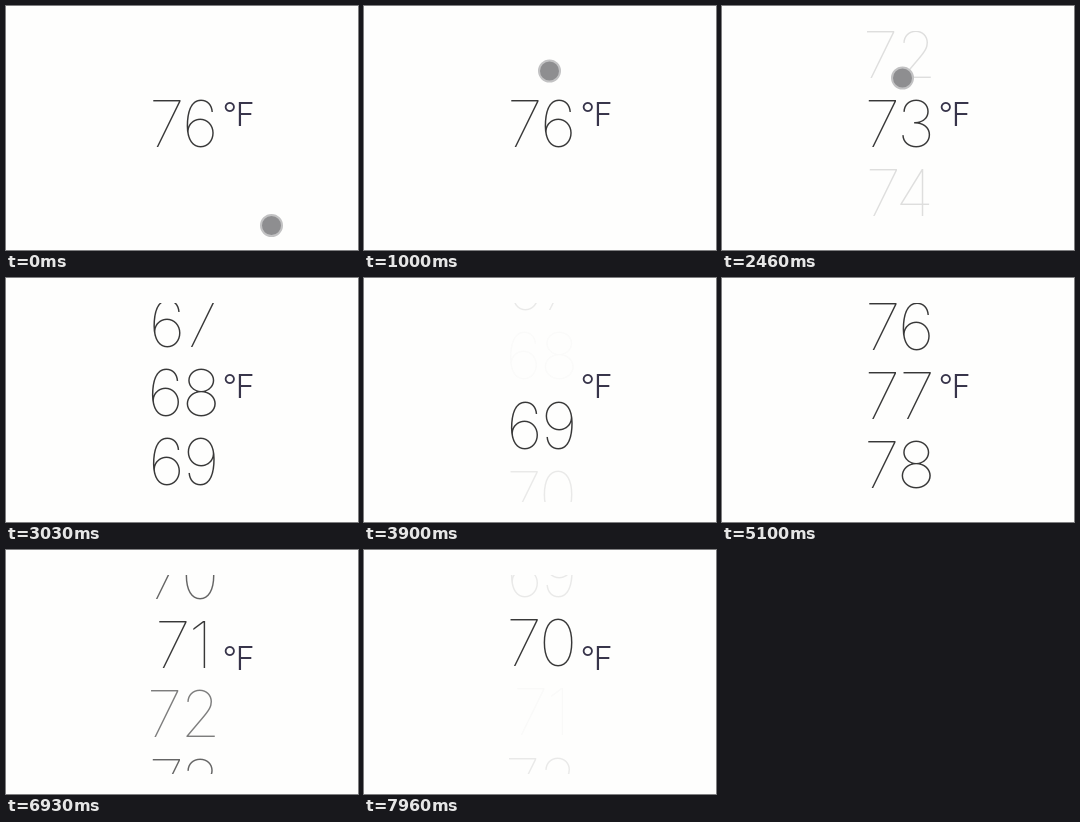
These frames come from a looping animation (352 px wide and 244 px high, 8 s). An HTML page:

```html
<!DOCTYPE html>
<html lang="en">
<head>
<meta charset="utf-8">
<title>Temperature picker</title>
<style>
html, body { margin: 0; width: 100%; height: 100%; overflow: hidden; background: #fefefd; }
svg { display: block; width: 100%; height: 100%; }
text { font-family: Inter, sans-serif; }
#wheel text { font-size: 64.5px; font-weight: 140; font-optical-sizing: none; letter-spacing: -.025em; text-anchor: middle; fill: #383838; }
#unit { font-size: 32px; font-weight: 300; letter-spacing: -.04em; fill: #37344a; }
#dot { fill: #8e8e90; stroke: #c2c2c3; stroke-width: 2; }
</style>
</head>
<body>
<svg viewBox="0 0 352 244">
  <clipPath id="window"><rect y="25" width="352" height="199"/></clipPath>
  <g id="wheel" clip-path="url(#window)"></g>
  <text id="unit" x="216.5" y="120">°F</text>
  <circle id="dot" r="10.5"/>
</svg>
<script>
const LOOP = 8000, PITCH = 69.2, BASELINE = 141.2, START = 76;

// Each swipe moves the dot from (x1, y1) to (x2, y2); the wheel glides to rest, then snaps.
const flicks = [
  { at: 1330, rest: 72.6, x1: 185.5, y1: 65, x2: 208, y2: 250 },
  { at: 2530, rest: 68, x1: 180.5, y1: 72, x2: 201, y2: 205 },
  { at: 3870, rest: 76.94, x1: 190, y1: 227, x2: 198, y2: 40 },
  { at: 5540, rest: 73.56, x1: 209, y1: 14.5, x2: 207, y2: 250 },
  { at: 6700, rest: 70, x1: 206, y1: 60, x2: 196, y2: 205 },
  { at: 7930, rest: 73.5, x1: 196, y1: 221, x2: 202, y2: 15 }
];

let value = START;
for (const f of flicks) {
  f.from = value;
  f.glide = f.at + 290 + 52 * Math.abs(f.rest - value);
  f.stop = f.at + 1.7 * (f.glide - f.at);
  value = f.to = Math.round(f.rest);
}

const easeOut = p => Math.sin(p * Math.PI / 2);
const easeInOut = p => (1 - Math.cos(p * Math.PI)) / 2;
const mix = (a, b, p) => a + (b - a) * p;
const progress = (t, from, to) => Math.min(1, Math.max(0, (t - from) / (to - from)));

function valueAt(t) {
  const f = flicks.findLast(f => t >= f.at);
  if (!f) return START;
  return t < f.glide
    ? mix(f.from, f.rest, easeOut(progress(t, f.at, f.glide)))
    : mix(f.rest, f.to, easeInOut(progress(t, f.glide, f.stop)));
}

// Neighbours show while the wheel turns
const fadeAt = t => Math.max(...flicks.map(f =>
  Math.min(progress(t, f.at, f.at + 300), 1 - progress(t, f.stop, f.stop + 400))));

function dotAt(t) {
  const first = flicks[0];
  if (t < first.at - 60) {
    const p = easeInOut(progress(t, 160, 500));
    const nudge = 6 * progress(t, 800, 830);
    return [mix(265.5, first.x1, p), mix(219.5, first.y1 - 6, p) + nudge];
  }
  const f = flicks.find(f => t >= f.at - 180 && t < f.at + 30);
  if (!f) return null;
  const p = progress(t, f.at - 60, f.at + 30);
  return [mix(f.x1, f.x2, p), mix(f.y1, f.y2, p)];
}

const wheel = document.getElementById("wheel");
const dot = document.getElementById("dot");
const labels = [];
for (let n = 64; n <= 80; n++) {
  const el = document.createElementNS("http://www.w3.org/2000/svg", "text");
  el.textContent = n;
  el.setAttribute("x", 177);
  wheel.append(el);
  labels.push({ n, el });
}

function draw(t) {
  const value = valueAt(t), fade = fadeAt(t), selected = Math.round(value);
  for (const { n, el } of labels) {
    const gap = Math.abs(n - value);
    el.setAttribute("y", BASELINE + (n - value) * PITCH);
    el.setAttribute("opacity", n === selected ? 1 : fade ** (3 - 2 * Math.min(1, gap)));
  }

  const spot = dotAt(t);
  dot.style.display = spot ? "" : "none";
  if (spot) {
    dot.setAttribute("cx", spot[0]);
    dot.setAttribute("cy", spot[1]);
  }
}

const start = performance.now();
function tick() {
  draw((performance.now() - start) % LOOP);
  requestAnimationFrame(tick);
}
tick();
</script>
</body>
</html>
```
